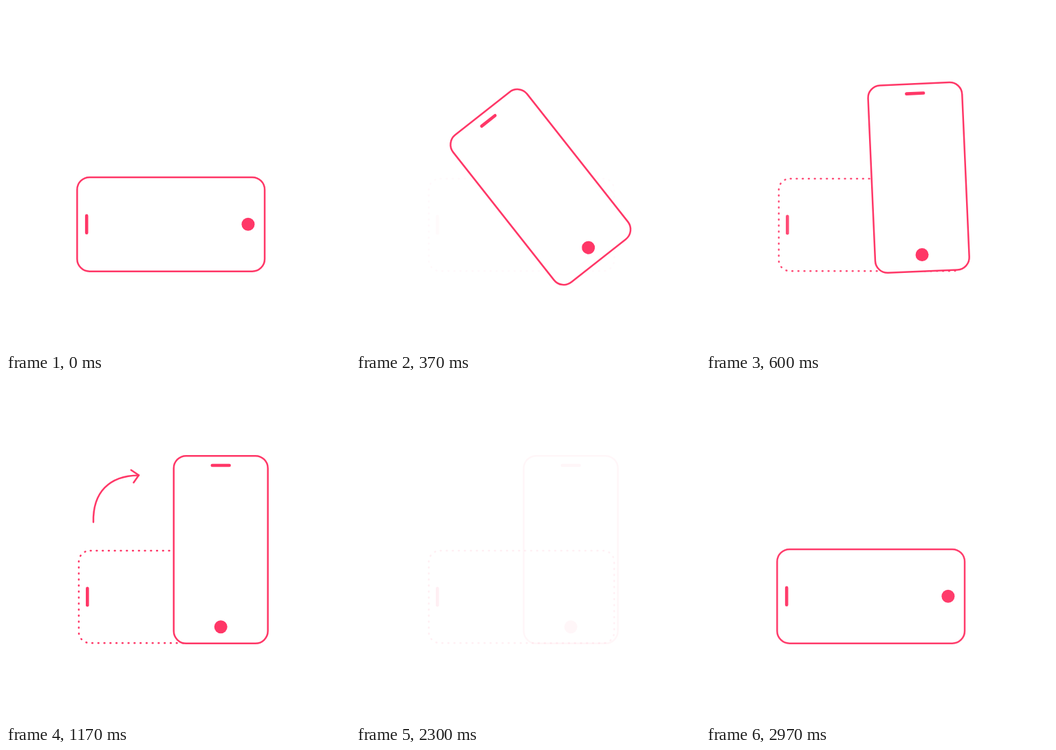
Write an HTML page with a canvas that moves like this. It is 500x500 px and loops after 3 s.

```html
<!DOCTYPE html>
<html lang="en">
<head>
<meta charset="utf-8">
<title>Rotate your phone</title>
<style>
  html, body { margin: 0; width: 100%; height: 100%; overflow: hidden; background: #fff; }
  canvas { display: block; width: 500px; height: 500px; }
</style>
</head>
<body>
<canvas id="stage" width="500" height="500"></canvas>
<script>
const ctx = document.getElementById('stage').getContext('2d');
const COLOR = '#ff3767';
const LOOP = 3000, FPS = 30, FRAMES = 90;
const PIVOT = { x: 309.85, y: 319.65 };
const SHAFT = [[127, 209.5], [126, 166], [150, 142], [192.5, 141.4]];
const TIP = [193, 141.2];
const BARBS = [[181.8, 133.8], [185.5, 152]];

const ramp = (f, a, b) => Math.min(1, Math.max(0, (f - a) / (b - a)));
const ease = (f, a, b) => { const u = ramp(f, a, b); return u * u * (3 - 2 * u); };

function bezier(t) {
  const s = 1 - t, k = [s * s * s, 3 * s * s * t, 3 * s * t * t, t * t * t];
  return [0, 1].map(axis => SHAFT.reduce((sum, p, i) => sum + k[i] * p[axis], 0));
}

function measureShaft() {
  let length = 0, last = bezier(0);
  for (let i = 1; i <= 100; i++) {
    const p = bezier(i / 100);
    length += Math.hypot(p[0] - last[0], p[1] - last[1]);
    last = p;
  }
  return length;
}
const SHAFT_LENGTH = measureShaft();

function line(x1, y1, x2, y2, width) {
  ctx.lineWidth = width;
  ctx.beginPath();
  ctx.moveTo(x1, y1);
  ctx.lineTo(x2, y2);
  ctx.stroke();
}

function drawGhost(alpha) {
  ctx.save();
  ctx.globalAlpha = alpha;
  line(118.3, 305.8, 118.3, 330.3, 4.6);
  ctx.lineWidth = 2.5;
  ctx.setLineDash([0.8, 7.96]);
  ctx.lineDashOffset = -1;
  ctx.beginPath();
  ctx.roundRect(105.8, 251, 269.5, 134.2, 16);
  ctx.stroke();
  ctx.restore();
}

function drawPhone(turn, alpha) {
  ctx.save();
  ctx.globalAlpha = alpha;
  ctx.translate(PIVOT.x, PIVOT.y);
  ctx.rotate(turn * Math.PI / 2);
  ctx.translate(-70.15, -2.35);
  ctx.beginPath();
  ctx.roundRect(-136.3, -68.4, 272.6, 136.8, 18);
  ctx.fillStyle = '#fff';
  ctx.fill();
  ctx.lineWidth = 2.5;
  ctx.stroke();
  line(-122.5, -12.4, -122.5, 12.4, 4.6);
  ctx.beginPath();
  ctx.arc(112.2, 0, 9.5, 0, Math.PI * 2);
  ctx.fillStyle = COLOR;
  ctx.fill();
  ctx.restore();
}

function drawShaft(from, to) {
  if (from >= to) return;
  ctx.save();
  ctx.lineWidth = 2.5;
  ctx.setLineDash([SHAFT_LENGTH * (to - from), 999]);
  ctx.lineDashOffset = -SHAFT_LENGTH * from;
  ctx.beginPath();
  ctx.moveTo(...SHAFT[0]);
  ctx.bezierCurveTo(...SHAFT[1], ...SHAFT[2], ...SHAFT[3]);
  ctx.stroke();
  ctx.restore();
}

function drawHead(from, to) {
  if (from >= to) return;
  for (const [x, y] of BARBS) {
    const dx = TIP[0] - x, dy = TIP[1] - y;
    line(x + dx * from, y + dy * from, x + dx * to, y + dy * to, 2.5);
  }
}

function draw(f) {
  ctx.clearRect(0, 0, 500, 500);
  ctx.strokeStyle = COLOR;
  ctx.lineCap = 'round';
  ctx.lineJoin = 'round';
  // the lying phone fades back in for the next loop
  if (f >= 82) {
    drawPhone(0, ease(f, 80, 90));
    return;
  }
  // a faint trace stays after the fade-out
  const fade = 1 - ease(f, 60, 70);
  if (f > 10) drawGhost(ease(f, 10, 20) * Math.max(0.08, fade));
  drawPhone(ease(f, 0, 20), Math.max(0.045, fade));
  drawShaft(ramp(f, 60, 63), ease(f, 20, 30));
  drawHead(ramp(f, 63, 65), ease(f, 30, 35));
}

function tick() {
  const time = performance.now() % LOOP;
  // small offset absorbs rounding of the 30 fps steps
  draw(Math.min(FRAMES - 1, Math.floor((time + 5) * FPS / 1000)));
  requestAnimationFrame(tick);
}
tick();
</script>
</body>
</html>
```
